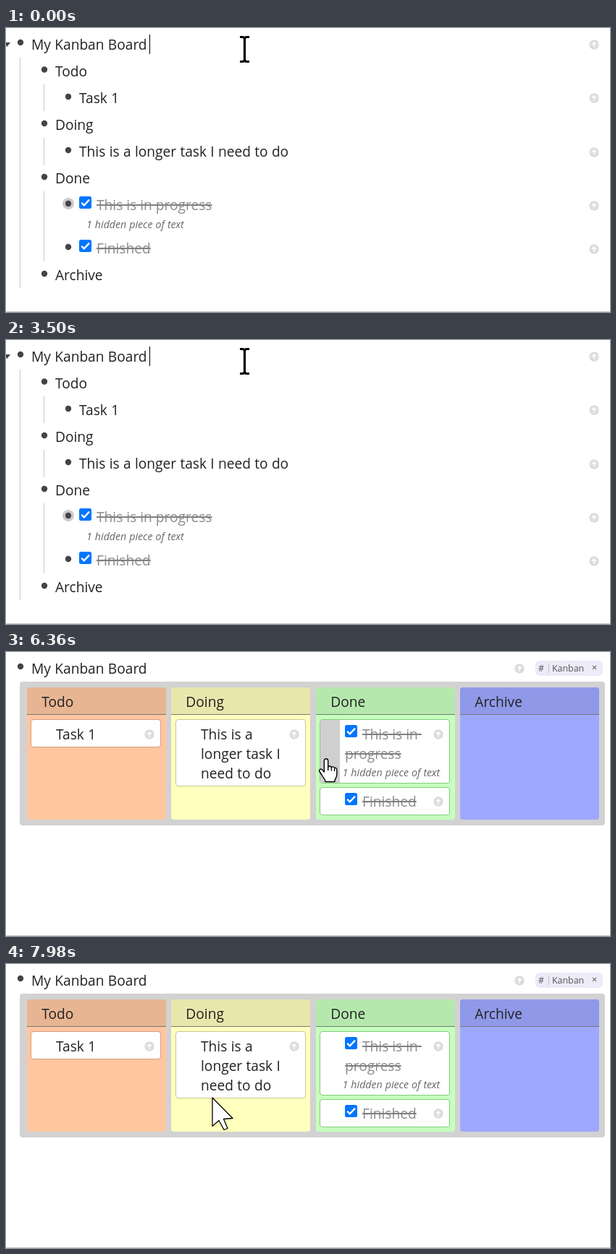
An HTML page that plays this animation: 834x393 px, repeating every 8 s.

```html
<!DOCTYPE html>
<html lang="en">
<head>
<meta charset="utf-8">
<title>Kanban board</title>
<style>
html, body { margin: 0; width: 100%; height: 100%; overflow: hidden; background: #fff; }
#stage { position: relative; width: 834px; height: 393px; overflow: hidden;
  font: 19.15px "Open Sans", "Noto Sans", sans-serif; word-spacing: .35px; color: #222; }
#stage div, #stage svg { position: absolute; box-sizing: border-box; }
#list, #board, #search, svg { left: 0; top: 0; }
.t { line-height: 0; white-space: pre; }
.done { color: #8c8c8c; text-decoration: line-through #808080 1.6px; word-spacing: 0; }
.note { font-size: 14.2px; font-style: italic; color: #666; }
.crumb { font-size: 12.8px; color: #6a6a6a; }
.hit { font-size: 19.9px; font-weight: 700; color: #111; }
.big { font-size: 20px; }
.hint { font-size: 12.9px; font-style: italic; color: #777; }
.tag { font-size: 12.4px; color: #555; }
mark { background: #fffb7d; color: inherit; }
.card { background: #fff; border: 1px solid; border-radius: 4px; }
.grip { background: #cfcfcf; border-radius: 3px 0 0 3px; }
#panel, #shade { left: 260px; top: 39px; width: 405px; border-radius: 12px; }
#panel { background: #fff; }
#shade { box-shadow: 0 4px 16px rgba(0,0,0,.22), 0 0 1px 1px rgba(0,0,0,.1); }
#query { left: 199px; top: 5px; height: 35px; background: #edebf9; }
#caret { top: 9px; width: 1px; height: 27px; background: #000; }
#glow { width: 36px; height: 36px; margin: -18px; border-radius: 50%; background: #f1e538; mix-blend-mode: multiply; }
svg { overflow: visible; }
</style>
</head>
<body>
<div id="stage"></div>
<script>
const stage = document.getElementById('stage');
const $ = id => document.getElementById(id);

// y is the middle of the capitals
const text = (x, y, s, cls = '', id = '') =>
  `<div class="t ${cls}" ${id && `id="${id}"`} style="left:${x}px;top:${y - .6}px">${s}</div>`;
const box = (x, y, w, h, color, more = '', attrs = '') =>
  `<div ${attrs} style="left:${x}px;top:${y}px;width:${w}px;height:${h}px;background:${color};${more}"></div>`;
const svg = (body, attrs = '') => `<svg width="834" height="393" ${attrs}>${body}</svg>`;
const dot = (x, y, r = 4.2, color = '#444') => `<circle cx="${x}" cy="${y}" r="${r}" fill="${color}"/>`;
const up = (x, y, r = 6.7, color = '#dcdcdc') => dot(x, y, r, color) +
  `<path d="M${x} ${y + r * .55}v${-r}m${-r * .45} ${r * .45}l${r * .45} ${-r * .45}l${r * .45} ${r * .45}" fill="none" stroke="#fff" stroke-width="1.5"/>`;
const check = (x, y) => `<rect x="${x}" y="${y}" width="17" height="17" rx="2.5" fill="#0075ff"/>
  <path d="M${x + 3.2} ${y + 8.8}l3.6 3.5l7.2-7.7" fill="none" stroke="#fff" stroke-width="2.3"/>`;
const page = (x, y, w, h) => `<path d="M${x} ${y}h${w * .62}l${w * .38} ${h * .3}v${h * .7}h${-w}z" fill="#444"/>
  <path d="M${x + w * .22} ${y + h * .53}h${w * .56}m0 ${h * .22}h${-w * .56}" stroke="#fff" stroke-width="${w / 11}"/>`;

function outline() {
  const bullets = [[53, 57.5], [86, 95], [53, 132], [86, 169], [53, 206], [86, 243], [86, 303], [53, 340]];
  const guides = 'M19.5 41V360M52.5 78V115M52.5 152V189M52.5 226V323';
  return svg(`<path d="${guides}" stroke="#c9c9c9"/>` + dot(86, 243, 8, '#cbcbcb') +
      bullets.map(b => dot(...b)).join('') +
      [23, 97, 172, 246, 306].map(y => up(812, y)).join('') +
      check(101, 233) + check(101, 293)) +
    text(68, 61, 'Todo') + text(101, 98, 'Task 1') +
    text(68, 135, 'Doing') + text(101, 172, 'This is a longer task I need to do') +
    text(68, 209, 'Done') + text(125, 246, 'This is in progress', 'done') +
    text(111, 272.5, '1 hidden piece of text', 'note') +
    text(125, 306, 'Finished', 'done') + text(68, 343, 'Archive');
}

function board() {
  const cols = [
    [29, 'Todo', '#ffc6a0', '#e8b592'], [228, 'Doing', '#ffffbe', '#e8e6ab'],
    [428, 'Done', '#c6ffbe', '#b5e8ad'], [627, 'Archive', '#9fa8ff', '#9099e8']];
  const card = (x, y, h, edge) => `<div class="card" style="left:${x}px;top:${y}px;width:180px;height:${h}px;border-color:${edge}"></div>`;
  const grip = (x, h, id) => box(x, 94, 27, h, '#cfcfcf', '', `class="grip" id="${id}"`);
  return box(19, 41, 808, 199, '#d2d2d2', 'border-radius:4px') +
    '<div id="cols" style="left:0;top:0">' +
    cols.map(([x, name, body, head]) => box(x, 49, 191.5, 183, body, 'border-radius:4px') +
      box(x, 49, 191.5, 38, head, 'border-radius:4px 4px 0 0;border-bottom:1px solid #777') +
      text(x + 20.3, 69.5, name)).join('') +
    card(34, 93, 39, '#d79f79') + card(234, 93, 93, '#c9c795') +
    card(433, 93, 89, '#84cc7a') + card(433, 187, 39, '#84cc7a') +
    grip(235, 91, 'gripDoing') + grip(434, 87, 'gripDone') + '</div>' +
    text(69, 114.5, 'Task 1') +
    ['This is a', 'longer task I', 'need to do'].map((s, i) => text(269, 114.5 + 27 * i, s)).join('') +
    text(492, 114.5, 'This is in ', 'done') + text(468, 141.5, 'progress', 'done') +
    text(464.5, 168, '1 hidden piece of text', 'note') + text(492, 208, 'Finished', 'done') +
    box(731, 12, 93, 21, '#edebf8', 'border-radius:6px') +
    text(735, 23.3, '#', 'tag') + text(746, 23, '<span style="color:#bbb">|</span>', 'tag') +
    text(754, 23.3, 'Kanban', 'tag') + text(809, 23, '×', 'tag') +
    svg(up(709, 23) + up(198, 114) + up(398, 114) + up(597, 114) + up(597, 207) +
      check(468, 101) + check(468, 195) +
      '<path id="fold" d="M227.500 110l3 3.500l-3 3.500z" fill="#555"/>');
}

function popup() {
  const word = '<span class="word"></span>';
  const crumbs = (y, last) => text(269, y, 'Custom CSS', 'crumb') + text(349, y, '›', 'crumb') +
    text(361, y, word, 'crumb') + text(413, y, '›', 'crumb') + text(425, y, last, 'crumb');
  return '<div id="shade"></div><div id="panel"></div><div id="results" style="left:0;top:0">' +
    box(260, 39, 405, 78, '#f0f2f1', 'border-radius:12px 12px 0 0') +
    box(260, 194, 405, 1, '#f0f0f0') + box(260, 251, 405, 1, '#f0f0f0') +
    svg(page(272, 58, 7.5, 10) + up(294.5, 62, 6.3, '#444') + page(273, 83, 12.5, 16)) +
    text(308, 62.5, 'Custom CSS', 'crumb') + text(294, 90, word, 'hit') +
    crumbs(140.5, 'Tags') + text(269.5, 168, word, 'hit') + crumbs(275.5, 'Code') + '</div>' +
    '<div id="create" style="left:0;top:0;width:834px">' +
    box(272, 207, 129, 31, '#f4f4f2', 'border:1px solid #cfcfcf;border-radius:3px') +
    text(276, 223.5, 'Create Rem:', 'big') + text(410, 225, '', 'big', 'newName') +
    '<div class="t hint" style="right:177px;top:226px">CTRL + ENTER to insert new</div></div>';
}

const beam = 'M-6.500-17H-3Q0-17 0-14Q0-17 3-17H6.500M0-15V15M-6.500 17H-3Q0 17 0 14Q0 17 3 17H6.500';
const arrow = 'M0 0V39.500L9 31.500L16 44.500L21 42.500L15.500 29.500L28 28.500Z';
const hand = 'M-3.700 2.500a2.700 2.700 0 0 1 5.400 0V11c1-1.500 4-1.500 4.700.5c1-1 3.700-1 4.200 1c1.200-.8 3.200 0 3.200 2.500V22c0 4-3 5-3 9.500H-2c0-3.500-3-5.500-5-9.500l-3.300-5c-1-2 1.500-4 3.500-2.500L-3.700 18Z';

stage.innerHTML =
  `<div id="list">${outline()}</div><div id="board">${board()}</div>` +
  svg(dot(20, 20) + '<path id="open" d="M-3 20H6L1.500 26Z" fill="#444"/><path d="M0 392.500H834" stroke="#c8c8c8"/>') +
  text(35, 24, 'My Kanban Board') + text(199, 24, '#', '', 'hash') +
  '<div id="search"><div id="query"></div>' +
  svg('<circle cx="218.500" cy="21" r="4" fill="none" stroke="#555" stroke-width="2"/><path d="M215.500 24L211.500 28.500" stroke="#555" stroke-width="2.400"/>') +
  text(230, 24, '', '', 'typed') + popup() + '</div>' +
  '<div id="caret"></div><div id="glow"></div>' +
  svg(`<g id="pointer">
    <path id="beam" d="${beam}" fill="none" stroke="#000" stroke-width="3.200"/>
    <path id="arrow" d="${arrow}" fill="#fff" stroke="#000" stroke-width="1.300" stroke-linejoin="round"/>
    <g id="hand" stroke="#000" stroke-width="1.400" stroke-linejoin="round"><path d="${hand}" fill="#fff"/>
      <path d="M1.700 11V16M6.400 12V16.500M10.600 13V17" fill="none"/></g></g>`);

const LOOP = 8000, TICK = 76.7;
const keys = [1240, 1320, 1470, 1640];
const caretX = [230, 241, 252, 263, 276];
const caretOn = [[0, 460], [690, 2250], [2720, 4050], [4510, 5060], [5590, 6050], [6590, 6820]];
// pointer path: tick, x, y
const path = [[0, 329.5, 29.5], [70, 329.5, 29.5], [75, 327, 48], [76, 327, 48], [79, 400, 120], [81, 450, 160],
  [83, 443, 148], [87, 443, 125], [91, 443, 125], [96, 337, 175], [98, 305, 195], [102, 270, 189], [104, 285, 185], [105, 285, 185]];

const within = (t, a, b) => t >= a && t < b;
const show = (id, on) => { $(id).style.visibility = on ? 'visible' : 'hidden'; };
const display = (id, on) => { $(id).style.display = on ? '' : 'none'; };

function pointerAt(tick) {
  const i = path.findIndex(p => p[0] > tick);
  const [t0, x0, y0] = path[i - 1], [t1, x1, y1] = path[i];
  const k = (tick - t0) / (t1 - t0);
  return [x0 + (x1 - x0) * k, y0 + (y1 - y0) * k];
}

function drawPointer(t) {
  const [x, y] = pointerAt(Math.min(104, Math.floor((t + 8) / TICK)));
  const onDoing = within(x, 234, 414) && within(y, 93, 184);
  const onDone = within(x, 433, 613) && within(y, 93, 182);
  const kind = (onDoing && x < 262) || (onDone && x < 461) ? 'hand' : onDoing || onDone || y < 41 ? 'beam' : 'arrow';
  for (const k of ['beam', 'arrow', 'hand']) display(k, k === kind);
  display('gripDoing', onDoing);
  display('fold', onDoing);
  display('gripDone', onDone);
  display('open', y < 41);
  $('pointer').setAttribute('transform', `translate(${x} ${y})`);
  $('glow').style.left = x + 'px';
  $('glow').style.top = y + 'px';
  show('glow', within(t, 6820, 7905));
}

function drawSearch(t) {
  const open = within(t, 920, 3500);
  const n = keys.filter(k => t >= k).length;
  display('search', open);
  display('hash', within(t, 690, 920));
  const x = open ? caretX[n] : within(t, 690, 920) ? 210 : 198;
  $('caret').style.left = x + 'px';
  show('caret', caretOn.some(r => within(t, ...r)));
  if (!open) return;
  $('query').style.width = x - 198 + 'px';
  $('typed').textContent = $('newName').textContent = 'kanb'.slice(0, n);
  for (const w of document.querySelectorAll('.word'))
    w.innerHTML = `<mark>${'Kanban'.slice(0, n)}</mark>${'Kanban'.slice(n)}`;
  display('results', n > 0);
  $('create').style.top = n ? 0 : '-155px';
  $('panel').style.height = $('shade').style.height = (n ? 262 : 57) + 'px';
}

function draw(t) {
  display('list', t < 3650);
  display('board', t >= 3650);
  $('cols').style.opacity = t < 3820 ? .75 : 1;
  drawSearch(t);
  drawPointer(t);
}

const start = performance.now();
function frame() {
  draw((performance.now() - start) % LOOP);
  requestAnimationFrame(frame);
}
frame();
</script>
</body>
</html>
```
